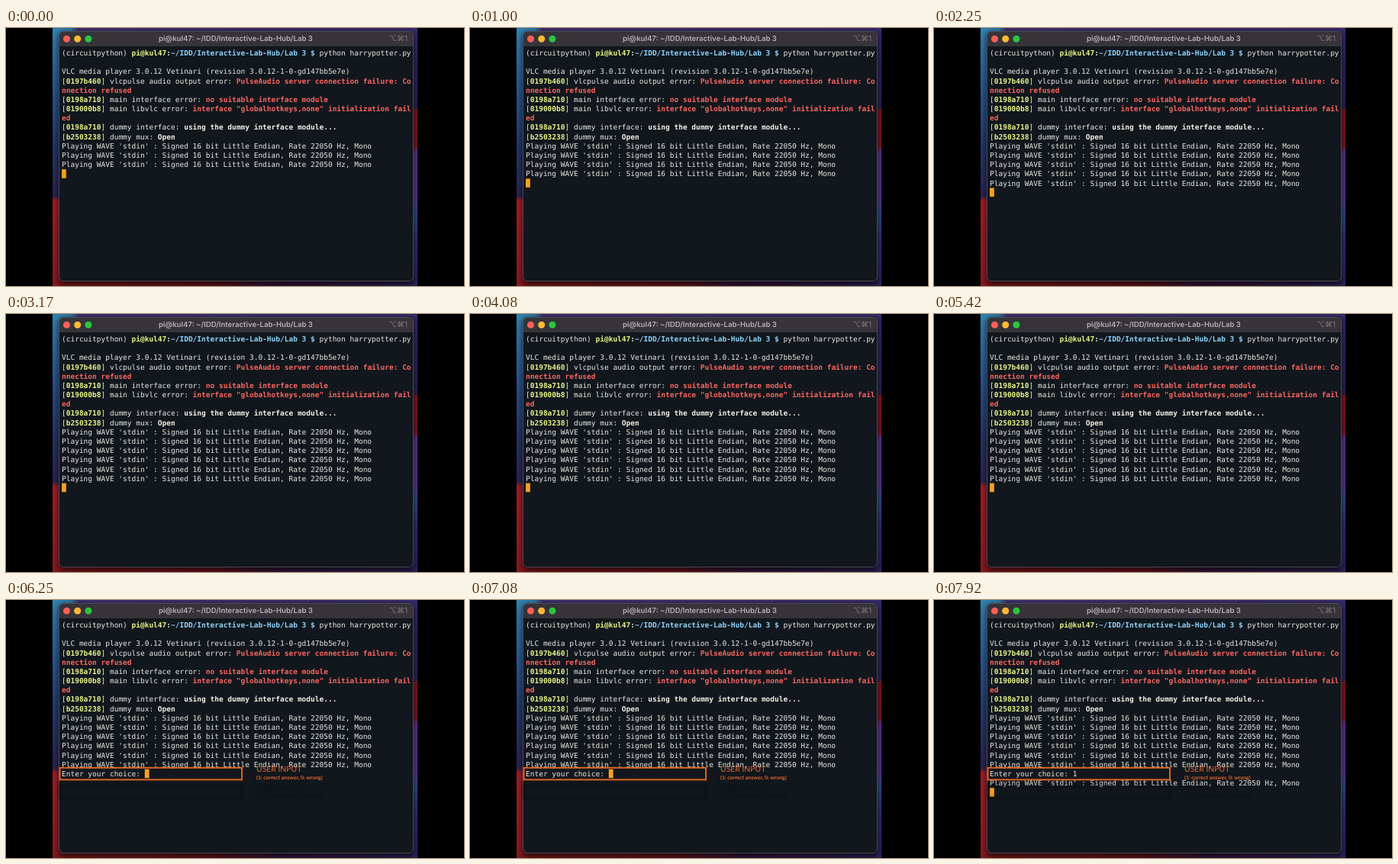
An HTML page for the animation above (8000 ms loop, 600 px wide and 338 px high).

```html
<!DOCTYPE html>
<html lang="en">
<head>
<meta charset="utf-8">
<title>Terminal session</title>
<style>
html, body { margin: 0; width: 100%; height: 100%; overflow: hidden; background: #000; }
svg { display: block; width: 600px; height: 338px; }
text { white-space: pre; text-rendering: geometricPrecision; }
#terminal { font: 9.51px "DejaVu Sans Mono", monospace; fill: #eae9e3; }
.host, .id, .path, .error, .strong { font-weight: bold; }
.host, .id { fill: #e9f589; }
.path { fill: #8ed3fb; }
.error { fill: #fa665f; }
.strong { fill: #f3f0e6; }
.bar { font: 600 9.58px Inter, sans-serif; fill: #b5b2b6; }
.keys { font: 10px Inter, "DejaVu Sans", sans-serif; fill: #7f7c82; }
.shadow { filter: blur(4px); opacity: .6; }
#note { fill: #e8682c; filter: drop-shadow(0 24px 2px rgba(0, 0, 0, .5)); }
#note text { font-family: Lato, sans-serif; }
</style>
</head>
<body>
<svg viewBox="0 0 600 338">
  <defs>
    <linearGradient id="left" x2="0" y2="1">
      <stop stop-color="#3384b4"/><stop offset=".2" stop-color="#2b5f9c"/>
      <stop offset=".45" stop-color="#26376f"/><stop offset=".65" stop-color="#2a2554"/>
      <stop offset=".67" stop-color="#a51f27"/><stop offset="1" stop-color="#8c1a20"/>
    </linearGradient>
    <linearGradient id="right" x2="0" y2="1">
      <stop stop-color="#372a68"/><stop offset=".31" stop-color="#2b2358"/>
      <stop offset=".32" stop-color="#841721"/><stop offset=".46" stop-color="#781829"/>
      <stop offset=".48" stop-color="#63308f"/><stop offset=".67" stop-color="#5a3594"/>
      <stop offset=".72" stop-color="#2a4f83"/><stop offset=".82" stop-color="#303070"/>
      <stop offset="1" stop-color="#30245f"/>
    </linearGradient>
    <linearGradient id="top">
      <stop stop-color="#3384b4"/><stop offset=".05" stop-color="#3078a8"/>
      <stop offset=".07" stop-color="#40306f"/><stop offset="1" stop-color="#372a68"/>
    </linearGradient>
    <linearGradient id="bottom">
      <stop stop-color="#8c1a20"/><stop offset=".45" stop-color="#6f1620"/>
      <stop offset=".6" stop-color="#3a1740"/><stop offset="1" stop-color="#30245f"/>
    </linearGradient>
    <clipPath id="desktop"><rect x="61" width="478" height="338"/></clipPath>
  </defs>
  <rect width="600" height="338"/>
  <g clip-path="url(#desktop)">
    <rect x="61" width="239" height="338" fill="url(#left)"/>
    <rect x="300" width="239" height="338" fill="url(#right)"/>
    <rect x="61" width="478" height="8" fill="url(#top)"/>
    <rect x="61" y="328" width="478" height="10" fill="url(#bottom)"/>
    <rect class="shadow" x="68" y="6" width="467" height="332" rx="6"/>
  </g>

  <rect x="69.5" y="4.5" width="464" height="327" rx="6" fill="#11171d"/>
  <path d="M69.5 24V10.5a6 6 0 0 1 6-6h452a6 6 0 0 1 6 6V24z" fill="#363339"/>
  <rect x="69.5" y="4.5" width="464" height="327" rx="6" fill="none" stroke="#53565b" stroke-width=".8"/>
  <circle cx="79.5" cy="14.2" r="4.5" fill="#fb5f57"/>
  <circle cx="93.7" cy="14.2" r="4.5" fill="#fcbb2f"/>
  <circle cx="107.9" cy="14.2" r="4.5" fill="#2ac640"/>
  <text class="bar" x="301" y="17.2" text-anchor="middle">pi@kul47: ~/IDD/Interactive-Lab-Hub/Lab 3</text>
  <text class="keys" x="526" y="17" text-anchor="end">⌥⌘1</text>

  <g id="terminal"></g>
  <rect id="cursor" width="5.8" height="11.6" fill="#f8a01c"/>
  <g id="note">
    <rect x="70.5" y="219.8" width="238.5" height="15.6" fill="none" stroke="#e0641f" stroke-width="2"/>
    <text x="328" y="225" font-size="10.4">USER INPUT</text>
    <text x="328" y="235" font-size="6.9" font-weight="bold">(1: correct answer, 0: wrong)</text>
  </g>
</svg>
<script>
const LOOP = 8000, LEFT = 73, FIRST_BASELINE = 36, PITCH = 12.18, CELL = 5.725;
const PROMPT_AT = 5830, ANSWER_AT = 7100;
const PROMPT = "Enter your choice: ";
const PLAYING = "Playing WAVE 'stdin' : Signed 16 bit Little Endian, Rate 22050 Hz, Mono";

const terminal = document.getElementById("terminal");
const cursor = document.getElementById("cursor");
const note = document.getElementById("note");
const rows = [];

// Parts are plain strings or [class, string]; a row is visible from its start time on.
function addRow(start, ...parts) {
  const text = document.createElementNS("http://www.w3.org/2000/svg", "text");
  text.setAttribute("x", LEFT);
  text.setAttribute("y", FIRST_BASELINE + rows.length * PITCH);
  for (const part of parts) {
    const [style, content] = Array.isArray(part) ? part : ["", part];
    const span = document.createElementNS(text.namespaceURI, "tspan");
    span.setAttribute("class", style);
    span.textContent = content;
    text.append(span);
  }
  terminal.append(text);
  rows.push({ start, text });
  return text;
}

const log = (id, label, style, message) =>
  addRow(0, "[", ["id", id], `] ${label}: `, [style, message]);

addRow(0, "(circuitpython) ", ["host", "pi@kul47"], ["strong", ":"],
  ["path", "~/IDD/Interactive-Lab-Hub/Lab 3 $"], " python harrypotter.py");
addRow(0);
addRow(0, "VLC media player 3.0.12 Vetinari (revision 3.0.12-1-0-gd147bb5e7e)");
log("0197b460", "vlcpulse audio output error", "error", "PulseAudio server connection failure: Co");
addRow(0, ["error", "nnection refused"]);
log("0198a710", "main interface error", "error", "no suitable interface module");
log("019000b8", "main libvlc error", "error", 'interface "globalhotkeys,none" initialization fail');
addRow(0, ["error", "ed"]);
log("0198a710", "dummy interface", "strong", "using the dummy interface module...");
log("b2503238", "dummy mux", "strong", "Open");
for (const start of [0, 0, 0, 500, 1600, 3150]) addRow(start, PLAYING);
const choice = addRow(PROMPT_AT, PROMPT);
addRow(ANSWER_AT, PLAYING);

function draw(now) {
  const time = now % LOOP;
  let shown = 0;
  for (const { start, text } of rows) {
    const visible = time >= start;
    text.style.display = visible ? "" : "none";
    shown += visible;
  }
  const answered = time >= ANSWER_AT, asking = time >= PROMPT_AT && !answered;
  choice.firstChild.textContent = PROMPT + (answered ? "1" : "");
  note.style.display = time >= PROMPT_AT ? "" : "none";
  cursor.setAttribute("x", LEFT + (asking ? PROMPT.length * CELL : 0));
  cursor.setAttribute("y", FIRST_BASELINE - 9.2 + (shown - asking) * PITCH);
  requestAnimationFrame(draw);
}
draw(0);
</script>
</body>
</html>
```
